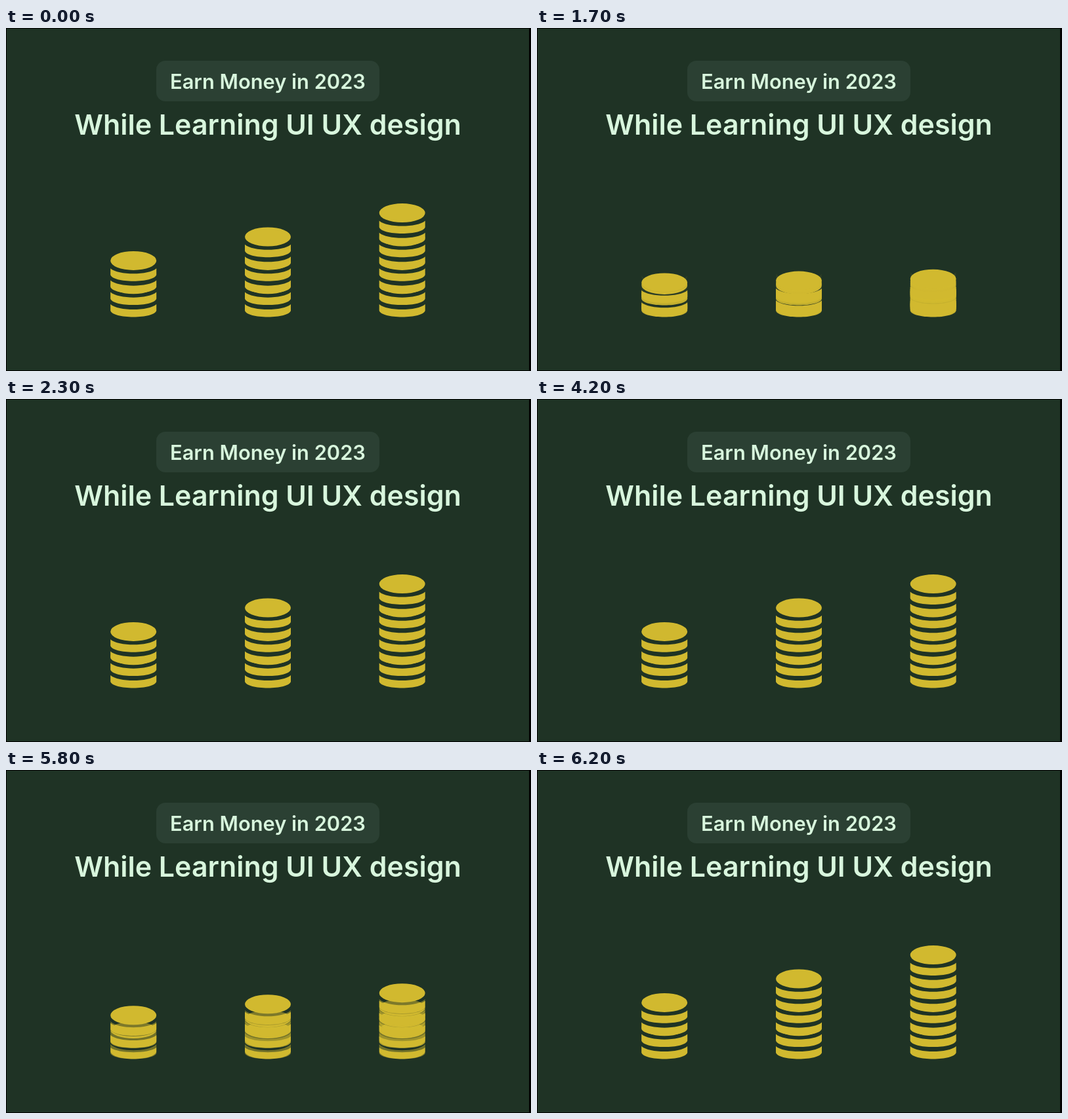
Animation of 800x524 px, one loop 7600 ms. Source, as an HTML page with a canvas:

```html
<!DOCTYPE html>
<html lang="en">
<head>
<meta charset="utf-8">
<title>Coin stacks</title>
<style>
  html, body { margin: 0; width: 100%; height: 100%; overflow: hidden; background: #000; }
  svg, canvas { position: absolute; left: 0; top: 0; width: 800px; height: 524px; }
  text { font-family: Inter, "Open Sans", sans-serif; font-weight: 600; fill: #d8f6dd; text-anchor: middle; }
</style>
</head>
<body>
<svg viewBox="0 0 800 524">
  <rect x="1" y="1" width="796" height="522" fill="#1f3325"/>
  <rect x="229" y="50" width="340" height="62" rx="14" fill="#2b4033"/>
  <text x="399" y="93" font-size="30.8">Earn Money in 2023</text>
  <text x="399" y="163" font-size="42.9">While Learning UI UX design</text>
</svg>
<canvas id="stage" width="800" height="524"></canvas>
<script>
const LOOP = 7600, STEP = 100;
const GOLD = '#d1b92f';
const BASE = 441.5, RISE = 36.4;            // floor line, height of one two-band unit
const COIN_H = 64.2, OPEN_H = 49.7;         // unit with a whole lid and with half a lid
const STACKS = [[194.2, 2], [399, 3], [603.7, 4]];
const CYCLES = [{ fade: 100, grow: 1563 }, { fade: 4190, grow: 5463 }];
const FADE_MS = 200, GROW_MS = 700;

const ctx = document.getElementById('stage').getContext('2d');
const mix = new OffscreenCanvas(800, 524).getContext('2d');

const sag = y => `M-35 ${y}C-23 ${y + 10.7} 23 ${y + 10.7} 35 ${y}`;
const band = y => sag(y) + `v9.8C33 ${y + 16} 18 ${y + 19.5} 0 ${y + 19.5}` +
  `S-33 ${y + 16} -35 ${y + 9.8}z`;
const bands = band(-37.9) + band(-19.5);
const coin = new Path2D(bands);
coin.ellipse(0, -OPEN_H, 35, 14.5, 0, 0, 7);
const openCoin = new Path2D(bands + sag(-OPEN_H) + `A35 14.5 0 0 1 -35 ${-OPEN_H}z`);

// cubic-bezier(.42, 0, .58, 1)
function ease(x) {
  if (x <= 0) return 0;
  if (x >= 1) return 1;
  let lo = 0, hi = 1, s;
  for (let i = 0; i < 24; i++) {
    s = (lo + hi) / 2;
    const at = 1.26 * s * (1 - s) ** 2 + 1.74 * s * s * (1 - s) + s ** 3;
    if (at < x) lo = s; else hi = s;
  }
  return s * s * (3 - 2 * s);
}

function clear(c) {
  c.setTransform(1, 0, 0, 1, 0, 0);
  c.clearRect(0, 0, 800, 524);
}

function fill(c, path, x, y, scale = 1, alpha = 1) {
  c.setTransform(1, 0, 0, scale, x, y);
  c.globalAlpha = alpha;
  c.fillStyle = GOLD;
  c.fill(path);
}

// Lower units lose half their lid: both shapes share a shrinking box and cross-fade.
function lowerUnit(x, y, p) {
  const h = COIN_H + (OPEN_H - COIN_H) * p;
  clear(mix);
  mix.globalCompositeOperation = 'lighter';
  fill(mix, coin, x, y, h / COIN_H, 1 - p);
  fill(mix, openCoin, x, y, h / OPEN_H, p);
  ctx.setTransform(1, 0, 0, 1, 0, 0);
  ctx.globalAlpha = 1;
  ctx.drawImage(mix.canvas, 0, 0);
}

function drawStacks(p) {
  for (const [x, count] of STACKS) {
    for (let i = 0; i < count; i++) {
      const y = BASE - i * RISE * p;
      if (i < count - 1) lowerUnit(x, y, p);
      else fill(ctx, coin, x, y);
    }
  }
}

// Dissolve from the full stacks to the single coins.
function drawDissolve(p) {
  drawStacks(1);
  ctx.setTransform(1, 0, 0, 1, 0, 0);
  ctx.globalCompositeOperation = 'destination-in';
  ctx.globalAlpha = 1 - p;
  ctx.fillRect(0, 0, 800, 524);
  ctx.globalCompositeOperation = 'lighter';
  for (const [x] of STACKS) fill(ctx, coin, x, BASE, 1, p);
  ctx.globalCompositeOperation = 'source-over';
}

function draw(t) {
  const cycle = CYCLES[t < CYCLES[1].fade ? 0 : 1];
  const gone = ease((t - cycle.fade) / FADE_MS);
  clear(ctx);
  if (gone < 1) drawDissolve(gone);
  else drawStacks(ease((t - cycle.grow) / GROW_MS));
}

const start = performance.now();
function tick() {
  const t = (performance.now() - start) % LOOP;
  draw(Math.floor(t / STEP) * STEP);
  requestAnimationFrame(tick);
}
tick();
</script>
</body>
</html>
```
